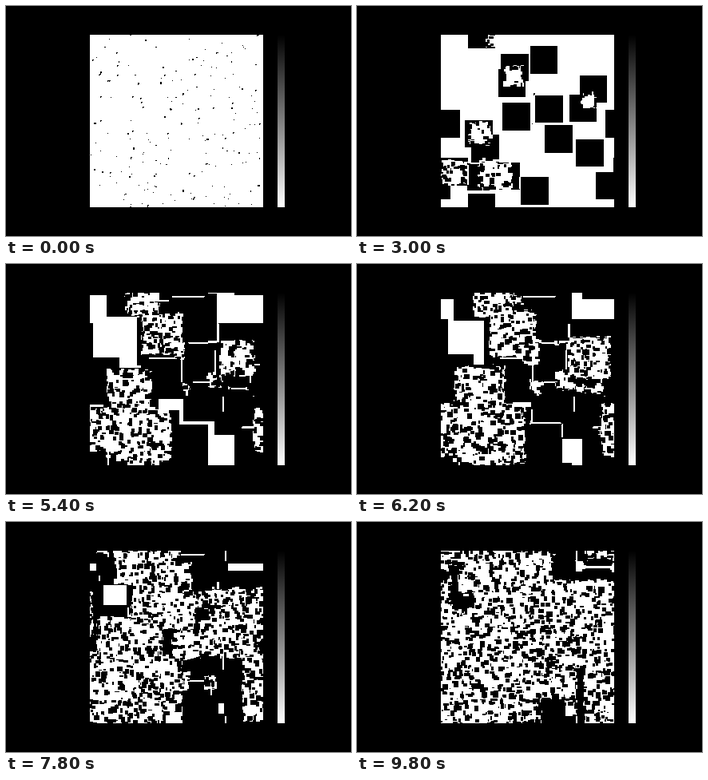
These frames come from a looping animation (432 px wide and 288 px high, 10 s). An HTML page with a canvas:

```html
<!DOCTYPE html>
<html lang="en">
<head>
<meta charset="utf-8">
<title>Cellular growth</title>
<style>
html, body { margin: 0; width: 100%; height: 100%; overflow: hidden; background: #000; }
canvas { position: absolute; left: 105px; top: 36px; width: 217px; height: 216px; }
.bar { position: absolute; left: 340px; top: 36px; width: 9px; height: 216px; background: linear-gradient(#000, #fff); }
</style>
</head>
<body>
<canvas id="field" width="217" height="216"></canvas>
<div class="bar"></div>
<script>
const N = 200, FRAMES = 50, STEP = 200;
const BLOBS = 1250, BLOB_LIFE = 5;

// Key points in stage pixels: every seed grows one cell per side and step.
const seeds = [
  [156, 36], [197, 77], [193.5, 96], [234, 67], [199.5, 139], [240.5, 129],
  [252.5, 167], [282.5, 128], [296.5, 104], [291.5, 184], [328, 147.5],
  [317, 224.5], [222.5, 231.5], [160.5, 179], [153, 160], [121, 208],
  [155, 214], [186, 213]
].map(toCell);

// Early turbulence, where seeds lie close together: x, y, first step.
const sparks = [
  [170, 43, 8], [195, 87, 4], [289, 117, 7],
  [154, 159, 2], [121, 208, 1], [172, 212, -4]
].map(([x, y, t]) => [...toCell([x, y]), t]);

function toCell([x, y]) {
  return [Math.round((x - 105) / 217 * N), Math.round((y - 36) / 216 * N)];
}

const wrap = d => ((d % N) + 1.5 * N) % N - N / 2;
const at = (x, y) => (y + N) % N * N + (x + N) % N;

function hash(a, b, c = 0) {
  let h = Math.imul(a + 101, 374761393) ^ Math.imul(b + 57, 668265263) ^ Math.imul(c + 13, 1274126177);
  h = Math.imul(h ^ (h >>> 15), 2246822519);
  h = Math.imul(h ^ (h >>> 13), 3266489917);
  return ((h ^ (h >>> 16)) >>> 0) / 4294967296;
}

function eachCell(visit) {
  for (let y = 0; y < N; y++) for (let x = 0; x < N; x++) visit(x, y, y * N + x);
}

const reach = new Float32Array(N * N).fill(1e3);
const chaos = new Float32Array(N * N).fill(1e3);
const owner = new Uint8Array(N * N);
const side = new Int8Array(N * N);
const seam = new Uint8Array(N * N);
const texture = new Uint8Array(N * N);

// Which seed's square arrives first, when, and on which side.
eachCell((x, y, i) => seeds.forEach(([sx, sy], k) => {
  const dx = wrap(x + .5 - sx), dy = wrap(y + .5 - sy);
  const d = Math.max(Math.abs(dx), Math.abs(dy)) - 1;
  if (d >= reach[i]) return;
  reach[i] = d;
  owner[i] = k;
  side[i] = Math.abs(dx) > Math.abs(dy) ? Math.sign(dx) : 2 * Math.sign(dy);
}));

// Opposing fronts leave a white seam; where three squares meet, turbulence starts.
eachCell((x, y, i) => {
  const block = [i, at(x + 1, y), at(x, y + 1), at(x + 1, y + 1)];
  for (const j of block.slice(1, 3))
    if (owner[i] !== owner[j] && side[i] === -side[j]) seam[i] = seam[j] = 1;
  const owners = new Set(block.map(j => owner[j]));
  const sides = new Set(block.map(j => side[j]));
  if (owners.size > 2 && sides.size > 1) sparks.push([x, y, reach[i] + 1]);
});

eachCell((x, y, i) => {
  for (const [sx, sy, t] of sparks) {
    const d = Math.max(Math.abs(wrap(x - sx)), Math.abs(wrap(y - sy)));
    chaos[i] = Math.min(chaos[i], Math.max(3, t + d));
  }
  chaos[i] += hash(x >> 2, y >> 2, 5) * 4 - 2;
});

// Short-lived growing rectangles; their overlaps give the ragged shapes.
function fillTexture(t) {
  texture.fill(0);
  for (let id = 0; id < BLOBS; id++) {
    const clock = t + id % BLOB_LIFE;
    const gen = Math.floor(clock / BLOB_LIFE), age = clock % BLOB_LIFE;
    const size = k => 1 + Math.floor(hash(id, gen, k) * 4 + age * .6);
    const w = size(1), h = size(2);
    const x0 = Math.floor(hash(id, gen, 3) * N), y0 = Math.floor(hash(id, gen, 4) * N);
    for (let y = 0; y < h; y++) for (let x = 0; x < w; x++) texture[at(x0 + x, y0 + y)] = 1;
  }
}

// Scattered dots at the start, of which very few survive.
function isDot(i, t) {
  const x = i % N, y = Math.floor(i / N);
  const limit = t ? .00008 : .005;
  return hash(x, y, 1) < limit || Math.min(hash(x - 1, y, 1), hash(x, y - 1, 1)) < limit / 4;
}

function isBlack(i, t) {
  if (reach[i] > t) return isDot(i, t);
  return chaos[i] <= t ? texture[i] : !seam[i];
}

const view = document.getElementById('field').getContext('2d');
const grid = document.createElement('canvas');
grid.width = grid.height = N;
const pen = grid.getContext('2d');
const image = pen.createImageData(N, N);
const pixels = new Uint32Array(image.data.buffer);
view.imageSmoothingEnabled = false;

function draw(t) {
  fillTexture(t);
  for (let i = 0; i < N * N; i++) pixels[i] = isBlack(i, t) ? 0xff000000 : 0xffffffff;
  pen.putImageData(image, 0, 0);
  view.drawImage(grid, 0, 0, 217, 216);
}

let shown = -1;
function tick() {
  const t = Math.floor(performance.now() / STEP) % FRAMES;
  if (t !== shown) draw(shown = t);
  requestAnimationFrame(tick);
}
tick();
</script>
</body>
</html>
```
